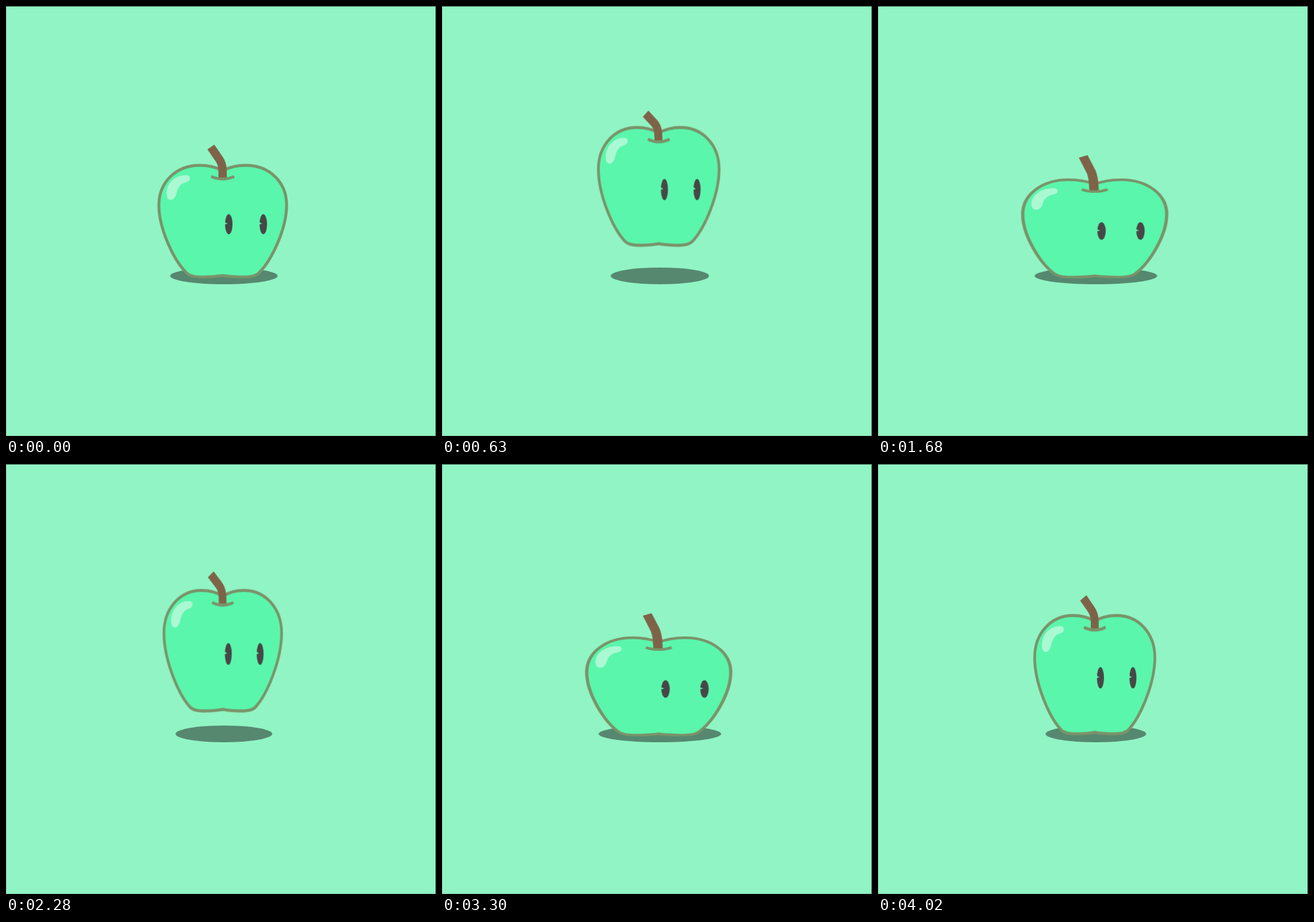
An HTML page without scripts that plays this animation: 748x748 px, repeating every 4050 ms.

```html
<!DOCTYPE html>
<html lang="en">
<head>
<meta charset="utf-8">
<title>Bouncing apple</title>
<style>
  html, body { margin: 0; width: 100%; height: 100%; overflow: hidden; background: #91f4c4; }
  svg { display: block; width: 100vw; height: 100vh; }

  .jump, .squash, .shadow, .stem {
    animation: 810ms cubic-bezier(.333, 0, .667, 1) infinite;
  }
  .jump { animation-name: jump; }
  .squash { animation-name: squash; animation-delay: -80ms; transform-origin: 377px 472px; }
  .shadow { animation-name: shadow; animation-delay: -80ms; transform-origin: 379px 469.5px; }
  .stem { animation-name: stem; animation-delay: -90ms; }

  .line { stroke: #7a936a; stroke-width: 5; }

  @keyframes jump {
    0%, 14.2%, 100% { transform: translateY(0); }
    59.26% { transform: translateY(-98px); }
  }
  /* stretch on landing, squash, stretch on take-off, widen at the top */
  @keyframes squash {
    0%, 100% { transform: scale(.894, 1.106); }
    24.69% { transform: scale(1.191, .809); }
    40.12% { transform: scale(.908, 1.092); }
    69.14% { transform: scale(1.044, .956); }
  }
  @keyframes shadow {
    0%, 100% { transform: scaleX(.878); }
    24.69% { transform: scaleX(1.202); }
    40.12% { transform: scaleX(.855); }
    69.14% { transform: scaleX(.971); }
  }
  @keyframes stem {
    0%, 7.41%, 100% { d: path("M355.8 248L370.5 267Q376.5 275 377 285L377 299"); }
    25.93% { d: path("M361 221.5L371.7 257.5Q372.2 264 374 277L375.5 299"); }
    56.17% { d: path("M336.8 288.5L358 282.5Q366.5 281 370 288L375 299"); }
  }
</style>
</head>
<body>
<svg viewBox="0 0 748 748" fill="none">
  <defs>
    <path id="half" d="M377 286C389 280 403 277 417 277C458 277 488 306 488 346C488 388 462 442 441 463C435 470 425 471.5 410 471.5C399 471.5 388 470.5 377 469"/>
    <g id="eye">
      <ellipse cx="387.5" cy="379.5" rx="6.5" ry="17.5" fill="#474747"/>
      <path d="M380 375.5L385.5 378.5L380 380Z" fill="#5af6ac"/>
    </g>
  </defs>

  <rect width="748" height="748" fill="#91f4c4"/>
  <path d="M.5 0V748M0 747.5H748" stroke="#7fc9a3"/>
  <path d="M0 .5H747.5V748" stroke="#2a4a3c"/>

  <ellipse class="shadow" cx="379" cy="469.5" rx="94" ry="14.5" fill="#568870"/>

  <g class="jump">
    <g class="squash">
      <g fill="#5af6ac">
        <use href="#half"/>
        <use href="#half" transform="matrix(-1 0 0 1 754 0)"/>
        <path d="M376 286H378V469H376Z"/>
      </g>
      <g class="line" stroke-linecap="round">
        <use href="#half"/>
        <use href="#half" transform="matrix(-1 0 0 1 754 0)"/>
      </g>
      <path fill="#aaf9d3" d="M313 294C319 294 321 298 319.5 302C317 307 311 306 306 309.5C299 315 298 321 296 328C294 334 290 337.5 286 337C280 336 279 330 279.5 323C281 306 296 294 313 294Z"/>
      <path class="stem" d="M355.8 248L370.5 267Q376.5 275 377 285L377 299" stroke="#7e6348" stroke-width="14.5"/>
      <path class="line" d="M357 296.5Q377 305 397 296.5"/>
      <use href="#eye"/>
      <use href="#eye" x="60"/>
    </g>
  </g>
</svg>
</body>
</html>
```
